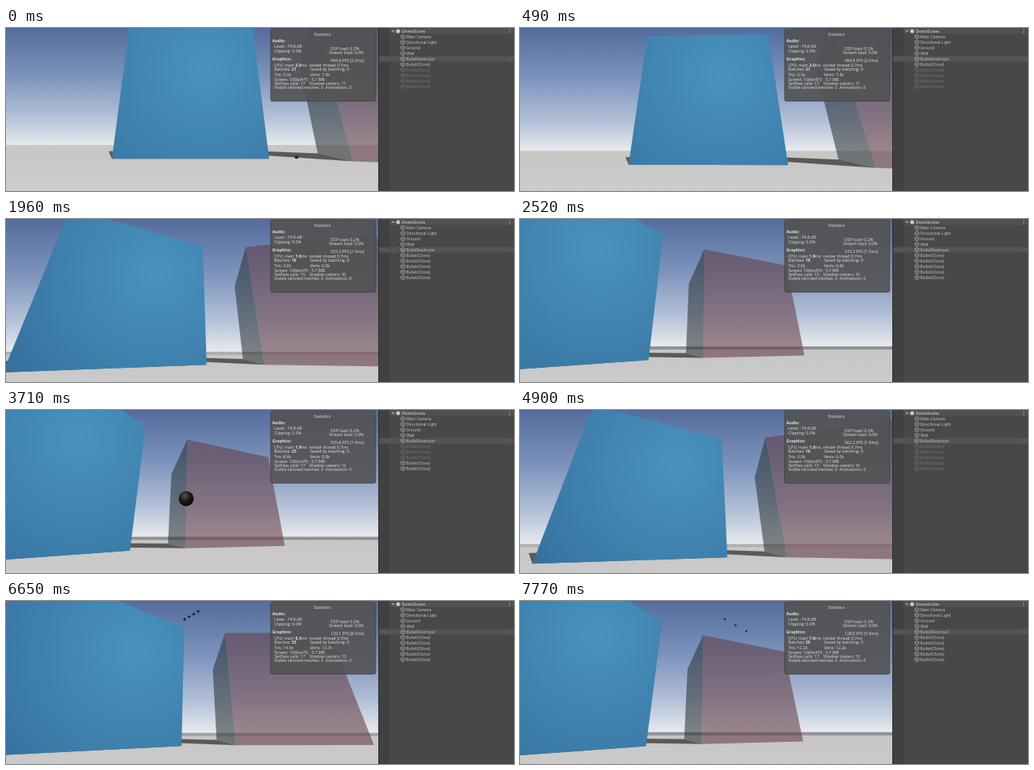
Animation, 640 px wide and 206 px high, one loop 7.84 s. Source, as an HTML page:

```html
<!DOCTYPE html>
<html lang="en">
<head>
<meta charset="utf-8">
<title>Bullet pool demo</title>
<style>
  html, body { margin: 0; width: 100%; height: 100%; overflow: hidden; background: #484848; }
  svg { display: block; width: 100vw; height: 100vh; }
  text { white-space: pre; }
  #stats { font: 5.2px "Open Sans", sans-serif; fill: #e2e2e2; }
  #tree { font: 5px Inter, sans-serif; fill: #c6c6c6; }
  .bold { font-weight: 700; }
</style>
</head>
<body>
<svg viewBox="0 0 640 206" preserveAspectRatio="none">
  <defs>
    <linearGradient id="sky" x1="0" y1="0" x2="0" y2="1">
      <stop offset="0" stop-color="#546c9c"/>
      <stop offset=".4" stop-color="#7b92bb"/>
      <stop offset=".75" stop-color="#b2c0d7"/>
      <stop offset="1" stop-color="#e9ebee"/>
    </linearGradient>
    <linearGradient id="floor" x1="0" y1="0" x2="0" y2="1">
      <stop offset="0" stop-color="#c6c6c6"/>
      <stop offset="1" stop-color="#d0d0d0"/>
    </linearGradient>
    <radialGradient id="paint" gradientUnits="userSpaceOnUse" r="230">
      <stop offset="0" stop-color="#4993bf"/>
      <stop offset="1" stop-color="#356f9c"/>
    </radialGradient>
    <radialGradient id="ball" cx=".4" cy=".3" r=".7">
      <stop offset="0" stop-color="#555"/>
      <stop offset=".5" stop-color="#1c1c1c"/>
      <stop offset="1" stop-color="#080808"/>
    </radialGradient>
    <clipPath id="view"><path d="M0 0H469V206H0z"/></clipPath>
  </defs>
  <g clip-path="url(#view)">
    <rect id="air" width="469" fill="url(#sky)"/>
    <rect id="ground" width="469" height="90" fill="url(#floor)"/>
    <rect id="far" width="469" height="4" fill="#85848a"/>
    <g fill="#5a5958">
      <polygon id="wallShade"/>
      <polygon id="boxShade"/>
    </g>
    <polygon id="side" fill="#2c3438" fill-opacity=".57"/>
    <polygon id="front" fill="#643f47" fill-opacity=".58"/>
    <polygon id="wall" fill="url(#paint)"/>
    <g id="bullets"></g>
  </g>
  <g id="stats">
    <rect x="333.4" y="1" width="132.4" height="91.5" rx="2.5" fill="#535354" fill-opacity=".9" stroke="#3c3e42" stroke-width=".7"/>
  </g>
  <path d="M469 0H640V206H469z" fill="#484848"/>
  <path d="M470 0H483V206H470z" fill="#414141"/>
  <path d="M483 0H640V7.5H483z" fill="#515151"/>
  <path d="M470 35.5H640V42.5H470z" fill="#545454"/>
  <path d="M469.5 0V206" stroke="#2c2c2c"/>
  <path d="M474 39H480" stroke="#6c5252" stroke-width="1.2"/>
  <path d="M485.8 3H489.4L487.6 5.6z" fill="#b0b0b0"/>
  <circle cx="494" cy="4" r="2.5" fill="#c8c8c8"/>
  <path d="M634.5 1.5V6.5" stroke="#b0b0b0" stroke-dasharray="1 1"/>
  <path d="M634.5 38L635.6 39L634.5 40" fill="none" stroke="#888" stroke-width=".6"/>
  <g id="tree"></g>
</svg>
<script>
const LOOP = 7840, STEP = 70;
const CENTER = { x: 234.5, y: 103 };
const FOCAL = CENTER.y / Math.tan(Math.PI / 6); // 60 degree vertical view
const FLOOR = -0.85, TOP = 9.2;                 // heights relative to the eye

// Where the camera looks, in degrees, and the state of the bullet pool.
const moments = [
  { t: 0, yaw: 0, pitch: 14.1, fps: 494.8, batches: 21, pool: "x----" },
  { t: 1400, yaw: -4, pitch: 21.9, fps: 567.1, batches: 29, pool: "-xxx-" },
  { t: 2520, yaw: 47.9, pitch: 18, fps: 533.3, batches: 18, pool: "xxxxx" },
  { t: 3710, yaw: 49.4, pitch: 17.8, fps: 535.8, batches: 25, pool: "---xx" },
  { t: 4900, yaw: 19.5, pitch: 20.4, fps: 562.2, batches: 18, pool: "-----" },
  { t: 6650, yaw: 31.2, pitch: 19.65, fps: 120.1, batches: 33, pool: "xxxxx" },
  { t: 7770, yaw: 48.5, pitch: 19.4, fps: 128, batches: 30, pool: "xxxxx" }
];
// Groups of shots, spread evenly between two screen points at time t.
const bursts = [
  { t: 0, from: [366, 163], to: [366, 163], count: 1, size: 2.3 },
  { t: 1400, from: [222, 54], to: [234, 105], count: 3, size: 2.7 },
  { t: 3710, from: [227, 112], to: [227, 112], count: 1, size: 9.5 },
  { t: 6650, from: [225, 23], to: [242, 13], count: 4, size: 1.7 },
  { t: 7770, from: [258, 23], to: [285, 38], count: 3, size: 1.2 }
];

const byId = id => document.getElementById(id);
const set = (node, attrs) => { for (const k in attrs) node.setAttribute(k, attrs[k]); };
function add(parent, tag, attrs, content = "") {
  const node = document.createElementNS("http://www.w3.org/2000/svg", tag);
  set(node, attrs);
  node.textContent = content;
  return parent.appendChild(node);
}
const mix = (a, b, u) => a + (b - a) * u;
const clamp = u => Math.min(1, Math.max(0, u));

// Ground plan: the wall faces the start view, the glass box stands turned beside it.
const shift = ([x, z], [dx, dz], k = 1) => [x + dx * k, z + dz * k];
const turn = 31 * Math.PI / 180;
const wallLeft = [-5.1, 9.5], wallRight = [4.9, 9.5];
const boxNear = [8.63, 8.05];
const boxRight = shift(boxNear, [Math.cos(turn), -Math.sin(turn)], 10.2);
const boxBack = shift(boxNear, [Math.sin(turn), Math.cos(turn)], 8.5);
const shadow = [-6.5, 11];

function makeCamera(yaw, pitch) {
  const [cy, sy, cp, sp] = [yaw, pitch].flatMap(a => [Math.cos(a), Math.sin(a)]);
  return ([x, z], y) => {
    const right = x * cy - z * sy, ahead = x * sy + z * cy;
    const scale = FOCAL / (ahead * cp + y * sp);
    return [CENTER.x + right * scale, CENTER.y - (y * cp - ahead * sp) * scale];
  };
}

function drawScene(yawDegrees, pitchDegrees) {
  const yaw = yawDegrees * Math.PI / 180, pitch = pitchDegrees * Math.PI / 180;
  const project = makeCamera(yaw, pitch);
  const horizon = CENTER.y + FOCAL * Math.tan(pitch);
  const polygon = (id, points) => set(byId(id), { points: points.join(" ") });
  const face = (id, a, b) =>
    polygon(id, [project(a, TOP), project(b, TOP), project(b, FLOOR), project(a, FLOOR)]);
  const shade = (id, a, b) =>
    polygon(id, [a, b, shift(b, shadow), shift(a, shadow)].map(p => project(p, FLOOR)));

  set(byId("air"), { height: horizon + 1 });
  set(byId("ground"), { y: horizon });
  set(byId("far"), { y: horizon, opacity: clamp(yawDegrees / 45) * .8 });
  shade("wallShade", wallLeft, wallRight);
  shade("boxShade", boxNear, boxBack);
  face("side", boxBack, boxNear);
  face("front", boxNear, boxRight);
  face("wall", wallLeft, wallRight);
  const [cx, cy] = project([1, 9.5], 5.5);
  set(byId("paint"), { cx, cy });
}

const shots = bursts.flatMap(({ t, from, to, count, size }) =>
  Array.from({ length: count }, (_, i) => {
    const k = count > 1 ? i / (count - 1) : 0;
    return {
      start: t - 70 - 150 * (count - i), end: t, size,
      x: mix(from[0], to[0], k), y: mix(from[1], to[1], k),
      node: add(byId("bullets"), "circle", { fill: "url(#ball)" })
    };
  }));

function drawBullets(t) {
  for (const { start, end, x, y, size, node } of shots) {
    const u = 1 - (1 - clamp((t - start) / (end - start))) ** 3;
    const late = Math.max(0, t - end);
    set(node, {
      cx: mix(CENTER.x, x, u),
      cy: mix(112, y, u) + 150 * (late / 1000) ** 2,
      r: mix(12, size, u) / (1 + late / 200),
      visibility: t >= start && late < 420 ? "visible" : "hidden"
    });
  }
}

const label = (x, y, content, cls = "") => add(byId("stats"), "text", { x, y, class: cls }, content);
label(388, 10, "Statistics");
label(335.5, 18, "Audio:", "bold");
label(338, 25, "Level: -74.8 dB");
label(409, 27.6, "DSP load: 0.2%");
label(338, 30.8, "Clipping: 0.0%");
label(407, 33, "Stream load: 0.0%");
label(335.5, 41, "Graphics:", "bold");
label(338, 66.5, "Screen: 1066x470 - 5.7 MB");
label(383, 54.4, "Saved by batching: 0");
label(338, 77.4, "Visible skinned meshes: 0  Animations: 0");
const live = {
  fps: label(409, 43.4), cpu: label(338, 49), batches: label(338, 54.4),
  tris: label(338, 60.6), verts: label(383, 60.6),
  passes: label(338, 72), casters: label(382, 72)
};

const tree = byId("tree");
add(tree, "text", { x: 499, y: 5.8, "font-weight": 600 }, "DemoScene");
const names = ["Main Camera", "Directional Light", "Ground", "Wall", "BulletDestroyer",
  ...Array(5).fill("Bullet(Clone)")];
const rows = names.map((name, i) => {
  const y = 11 + i * 7, row = add(tree, "g", {});
  add(row, "path", {
    d: `M500 ${y - 2.8}l2.5 1.4v2.8l-2.5 1.4l-2.5 -1.4v-2.8zm-2.5 1.4l2.5 1.4l2.5 -1.4m-2.5 1.4v2.8`,
    fill: "none", stroke: "#c0c0c0", "stroke-width": .55
  });
  add(row, "text", { x: 504.3, y: y + 1.8 }, name);
  return row;
});

// Writes a line in which *starred* parts are bold.
function write(node, line) {
  node.textContent = "";
  line.split("*").forEach((part, i) => add(node, "tspan", { class: i % 2 ? "bold" : "" }, part));
}

function drawPanels({ fps, batches, pool }) {
  const extra = batches - 18, ms = (1000 / fps).toFixed(1);
  write(live.fps, `${fps.toFixed(1)} FPS (${ms}ms)`);
  write(live.cpu, `CPU: main *${ms}*ms  render thread 0.7ms`);
  write(live.batches, `Batches: *${batches}*`);
  write(live.tris, `Tris: ${(3 + extra * .767).toFixed(1)}k`);
  write(live.verts, `Verts: ${(6 + extra * .515).toFixed(1)}k`);
  write(live.passes, `SetPass calls: ${extra ? 17 : 15}`);
  write(live.casters, `Shadow casters: ${Math.min(15, 10 + Math.floor(extra * .42))}`);
  rows.slice(5).forEach((row, i) => set(row, { opacity: pool[i] === "x" ? 1 : .36 }));
}

function render(now) {
  const t = Math.floor(now % LOOP / STEP) * STEP;
  const next = moments.findIndex(m => m.t > t);
  const b = moments[next < 0 ? moments.length - 1 : next];
  const a = moments[moments.indexOf(b) - 1];
  const u = (t - a.t) / (b.t - a.t), eased = u * u * (3 - 2 * u);
  drawScene(mix(a.yaw, b.yaw, eased), mix(a.pitch, b.pitch, eased));
  drawBullets(t);
  drawPanels(u < .5 ? a : b);
}

const began = performance.now();
function tick() {
  render(performance.now() - began);
  requestAnimationFrame(tick);
}
tick();
</script>
</body>
</html>
```
